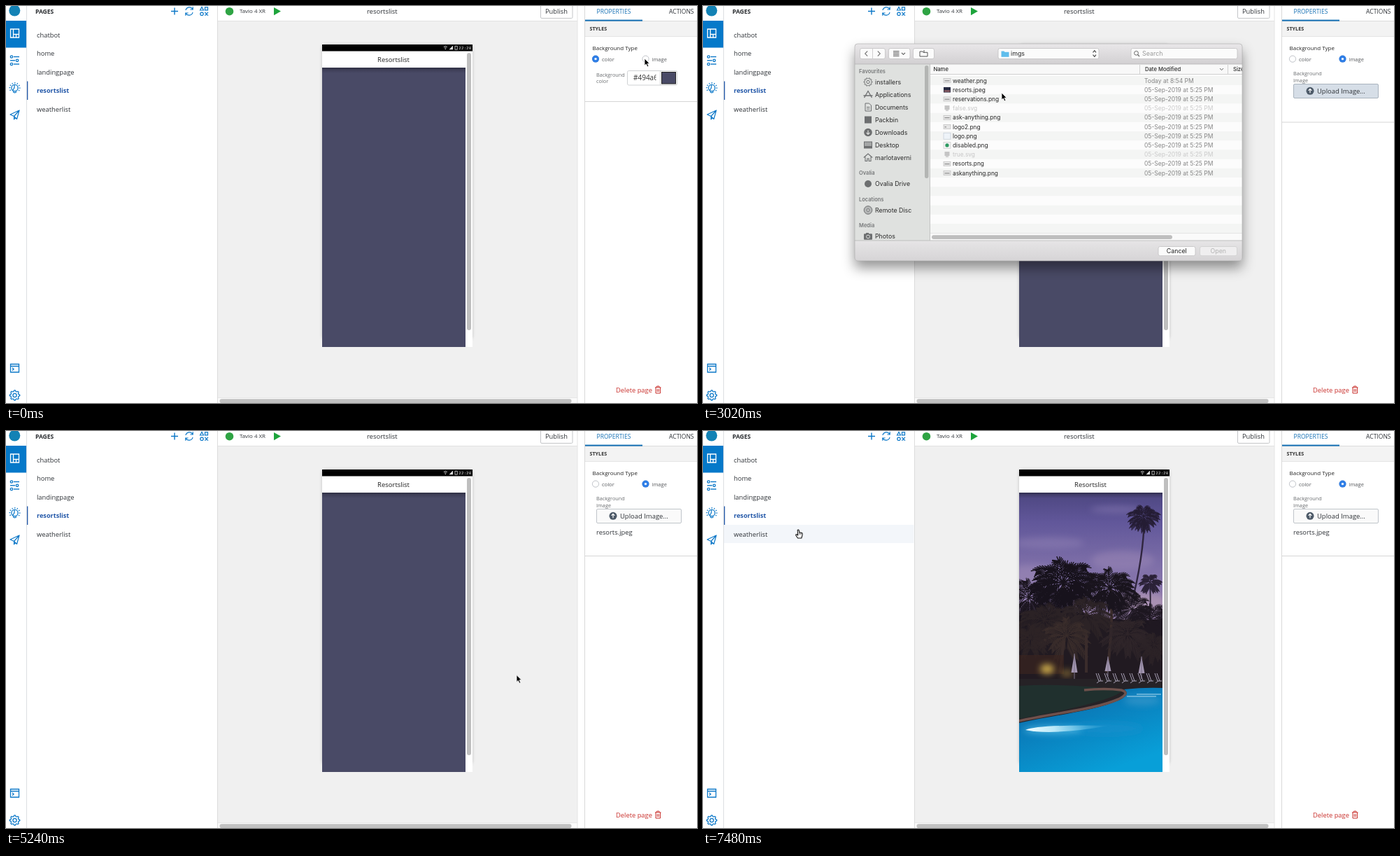
Write an HTML page that moves like this. It is 988x567 px and loops after 8 s.

```html
<!DOCTYPE html>
<html lang="en">
<head>
<meta charset="utf-8">
<title>Page builder: background image</title>
<style>
html, body { margin: 0; width: 100%; height: 100%; overflow: hidden; background: #fff; }
svg { display: block; width: 988px; height: 567px; font-family: "Open Sans", "Noto Sans", sans-serif; }
text { white-space: pre; }
.mac { font-family: Inter, "Liberation Sans", sans-serif; }
</style>
</head>
<body>
<svg id="stage" viewBox="0 0 988 567" xmlns="http://www.w3.org/2000/svg"></svg>
<script>
const LOOP = 8000;
const BLUE = '#0c78c8', INK = '#2f3338', NAVY = '#494a66';

// Shape helpers
const rect = (x, y, w, h, fill, more = '') => `<rect x="${x}" y="${y}" width="${w}" height="${h}" fill="${fill}" ${more}/>`;
const circle = (x, y, r, fill, more = '') => `<circle cx="${x}" cy="${y}" r="${r}" fill="${fill}" ${more}/>`;
const line = (d, color, w = 1, more = '') => `<path d="${d}" fill="none" stroke="${color}" stroke-width="${w}" ${more}/>`;
const area = (d, fill, more = '') => `<path d="${d}" fill="${fill}" ${more}/>`;
const text = (x, y, s, size, fill = INK, more = '') => `<text x="${x}" y="${y}" font-size="${size}" fill="${fill}" ${more}>${s}</text>`;
const group = (id, body, more = '') => `<g id="${id}" ${more}>${body}</g>`;
const MID = 'text-anchor="middle"', BOLD = 'font-weight="700"', ROUND = 'stroke-linecap="round" stroke-linejoin="round"';

function gradient(id, stops, x2 = 0, y2 = 1) {
  const body = stops.map(([at, c, o = 1]) => `<stop offset="${at}" stop-color="${c}" stop-opacity="${o}"/>`).join('');
  return `<linearGradient id="${id}" x1="0" y1="0" x2="${x2}" y2="${y2}">${body}</linearGradient>`;
}

function gear(x, y, r, teeth, color, w = 1.2) {
  let d = '';
  for (let i = 0; i < teeth * 4; i++) {
    const a = (i - .5) * Math.PI / teeth / 2, q = i % 4 < 2 ? r : r * .78;
    d += (i ? 'L' : 'M') + (x + q * Math.cos(a)).toFixed(1) + ' ' + (y + q * Math.sin(a)).toFixed(1);
  }
  return line(d + 'Z', color, w, 'stroke-linejoin="round"') + circle(x, y, r * .36, 'none', `stroke="${color}" stroke-width="${w}"`);
}

let seed = 11;
const rnd = () => (seed = seed * 16807 % 2147483647) / 2147483647;

// Crown of arched fronds with leaflets on both sides
function palm(x, y, r, n, color) {
  let d = '';
  const f = v => v.toFixed(1);
  for (let i = 0; i < n; i++) {
    const a = 2 * Math.PI * (i + rnd() * .6) / n, len = r * (.7 + .3 * rnd());
    const mx = x + Math.cos(a) * len * .6, my = y + Math.sin(a) * len * .6 - len * .14;
    const ex = x + Math.cos(a) * len, ey = y + Math.sin(a) * len * .8 + len * .2;
    d += `M${f(x)} ${f(y)}Q${f(mx)} ${f(my)} ${f(ex)} ${f(ey)}`;
    for (let k = 2; k < 13; k++) {
      const u = k / 13, v = 1 - u, leaf = r * .3 * (1 - u * .5);
      const px = v * v * x + 2 * u * v * mx + u * u * ex, py = v * v * y + 2 * u * v * my + u * u * ey;
      const way = Math.atan2(v * (my - y) + u * (ey - my), v * (mx - x) + u * (ex - mx));
      for (const turn of [-.6, .6])
        d += `M${f(px)} ${f(py)}l${f(Math.cos(way + turn) * leaf)} ${f(Math.sin(way + turn) * leaf + leaf * .35)}`;
    }
  }
  return line(d, color, Math.max(1, r * .026), 'stroke-linecap="round"');
}

const defs = `<defs>
  ${gradient('sky', [[0, '#4c4680'], [.14, '#61579a'], [.35, '#7e6fa8'], [.55, '#9580b0'], [.8, '#a98aa8']])}
  ${gradient('pool', [[0, '#0d5f97'], [.4, '#0a7cba'], [1, '#089fd8']], .6)}
  ${gradient('beam', [[0, '#f4feff'], [.35, '#c9f0fc', .9], [1, '#5cc4ea', 0]], 1, 0)}
  ${gradient('under', [[0, '#20202f', .6], [.5, '#20202f', .22], [1, '#20202f', 0]])}
  ${gradient('bar', [[0, '#e9e7e9'], [1, '#d2d0d2']])}
  ${gradient('foot', [[0, '#e6e5e6'], [1, '#d6d4d6']])}
  ${gradient('go', [[0, '#62adfb'], [1, '#0b68f6']])}
  ${gradient('goDown', [[0, '#4394f4'], [1, '#0c57e0']])}
  <clipPath id="screen"><rect x="452" y="88" width="205" height="399"/></clipPath>
  <clipPath id="hexBox"><rect x="890" y="93" width="39.5" height="20"/></clipPath>
  <clipPath id="sheet"><rect x="217" y="54" width="554" height="310" rx="4"/></clipPath>
  <clipPath id="side"><rect x="217" y="83" width="108" height="252"/></clipPath>
  <filter id="soft" x="-50%" y="-100%" width="200%" height="300%"><feGaussianBlur stdDeviation="5"/></filter>
  <filter id="drop" filterUnits="userSpaceOnUse" x="140" y="0" width="720" height="470">
    <feDropShadow dx="0" dy="10" stdDeviation="9" flood-opacity=".42"/></filter>
  <filter id="lift" filterUnits="userSpaceOnUse" x="430" y="40" width="260" height="460">
    <feDropShadow dx="0" dy="0" stdDeviation="2" flood-opacity=".2"/></filter>
</defs>`;

function rail() {
  const plane = 'M6 155 19 149 15.5 161.5 11.5 157.5ZM11.5 157.5 19 149M11.5 157.5V162L13.3 159.3';
  let rays = '';
  for (let i = 0; i < 9; i++) {
    const a = Math.PI * (.85 + i * .165), c = Math.cos(a), s = Math.sin(a);
    rays += `M${12.5 + c * 6.3} ${117 + s * 6.3}L${12.5 + c * 8} ${117 + s * 8}`;
  }
  let rows = '';
  [72.5, 77.8, 83].forEach((y, i) => {
    const x = i === 1 ? 16 : 8;
    rows += circle(x, y, 1.7, '#fff', `stroke="${BLUE}" stroke-width="1.3"`)
      + line(i === 1 ? `M6 ${y}H13` : `M11 ${y}H19`, BLUE, 1.4);
  });
  return rect(29, 0, 1, 567, '#dcdfe2') + circle(12.3, 6.5, 8, '#1382b5') + rect(0, 21, 29, 38.5, '#0579c9')
    + line('M6.5 33H18.5V45H6.5ZM10.5 33V45M10.5 40.5H18.5M14.5 40.5V45', '#fff', 1.3)
    + rows + line(rays, BLUE, 1.2) + circle(12.5, 117, 4.6, 'none', `stroke="${BLUE}" stroke-width="1.3"`)
    + line('M9 121Q12.5 118 12 113M10 122.5Q12.5 125 15 122.5', BLUE, 1.2)
    + line(plane, BLUE, 1.2, ROUND)
    + line('M6.5 511.5H18.5V523H6.5ZM6.5 514.5H18.5M9 516.8 11 518.7 9 520.5', BLUE, 1.3)
    + gear(12.5, 556, 7.2, 8, BLUE, 1.3);
}

function pages() {
  const names = ['chatbot', 'home', 'landingpage', 'resortslist', 'weatherlist'];
  return group('hoverRow', rect(30, 134, 271.5, 26, '#f3f6fa'))
    + rect(302, 0, 1, 567, '#dcdcdc') + text(42, 10.6, 'PAGES', 8.5, '#2a2d31', BOLD)
    + line('M241 2.5V12.5M236 7.5H246', BLUE, 1.4)
    + line('M257 6A5.3 5.3 0 0 1 266.8 4.5M267.2 1.2V5H263.4M267 9A5.3 5.3 0 0 1 257.2 10.5M256.8 13.8V10H260.6', BLUE, 1.2)
    + line('M277.5 6 280 1.5 282.5 6ZM284.5 1.8H288.5V5.8H284.5ZM284.3 9 289 13.7M289 9 284.3 13.7', BLUE, 1.2)
    + circle(280, 11.3, 2.2, 'none', `stroke="${BLUE}" stroke-width="1.2"`)
    + names.map((s, i) => i === 3
      ? text(44, 124, s, 9.15, '#2257a8', BOLD) : text(44, 45 + i * 26.4, s, 9.35)).join('')
    + rect(30, 107.5, 1.3, 26.5, '#2257a8');
}

function canvas() {
  return rect(303, 21, 514, 539, '#f0f0f0') + rect(303, 21, 514, 1, '#e2e2e2')
    + rect(303, 559, 514, 8, '#fafafa') + rect(303, 559, 514, 1, '#e6e6e6')
    + rect(305.5, 561.3, 503, 5.7, '#c1c1c1', 'rx="2.8"')
    + rect(816.5, 0, 1, 567, '#e4e4e4')
    + circle(319.5, 7.7, 5.8, '#2fa444') + text(334, 10, 'Tavio 4 XR', 7.9)
    + area('M383 2 393 7.6 383 13.2Z', '#1ea43c')
    + text(537.8, 11.2, 'resortslist', 9.5, INK, MID)
    + rect(764.5, -3.5, 45.5, 21, '#fff', 'rx="1.5" stroke="#c4c6c8"')
    + text(787, 11.3, 'Publish', 9.35, INK, MID);
}

function phone() {
  return rect(452, 55, 215, 421, '#fff', 'rx="5" filter="url(#lift)"')
    + rect(452, 55, 215, 432, '#fff') + rect(452, 55, 215, 9.5, '#000')
    + line('M625.8 58.5Q628.3 56 630.8 58.5M626.9 60Q628.3 58.7 629.7 60', '#ddd', .9) + circle(628.3, 61.4, .7, '#ddd')
    + area('M633.5 62.3H639V56.5Z', '#ddd') + rect(642, 57.2, 3.2, 5, 'none', 'stroke="#ddd" stroke-width=".8"')
    + text(647.3, 61.8, '22:20', 6, '#eee', 'font-family="Liberation Mono, monospace"')
    + text(554, 80, 'Resortslist', 9.5, '#222', MID)
    + rect(659, 67, 6, 396, '#bfbfbf', 'rx="3"')
    + rect(452, 88, 205, 399, NAVY) + group('photo', photo(), 'clip-path="url(#screen)"')
    + rect(452, 88, 205, 8, 'url(#under)');
}

function photo() {
  const cloud = (x, y, rx, ry, c, o) => `<ellipse cx="${x}" cy="${y}" rx="${rx}" ry="${ry}" fill="${c}" opacity="${o}" filter="url(#soft)"/>`;
  const shade = (x, y, h) => area(`M${x} ${y}l4.5 ${h * .75}h-9Z`, '#a396b0') + rect(x - .5, y, 1, h, '#7b7088');
  let chairs = '';
  for (let x = 562; x < 655; x += 12) chairs += `M${x} 346l4 11h6M${x + 3} 346l4 11M${x + 1} 360l4 -3`;
  return rect(452, 88, 205, 300, 'url(#sky)')
    + cloud(590, 112, 36, 5, '#8b7db5', .5) + cloud(495, 160, 50, 8, '#8f80b4', .5)
    + cloud(600, 185, 45, 14, '#9c88b6', .5) + cloud(470, 205, 35, 14, '#a08cb8', .5) + cloud(625, 245, 40, 14, '#b79cb4', .6)
    + line('M631 124Q630 180 612 250', '#30263f', 2.4) + palm(630, 122, 25, 13, '#241c33')
    + line('M639 218Q641 245 637 300', '#241c30', 1.8) + palm(639, 216, 18, 11, '#2a2136')
    // tree belt
    + area('M452 262Q500 250 550 262T657 268V370H452Z', '#211a21')
    + palm(466, 238, 40, 14, '#1b151f') + palm(640, 268, 36, 14, '#1f1822') + palm(614, 255, 34, 13, '#1d1720')
    + line('M515 218Q522 270 510 345M583 226Q587 290 577 345M548 272V345', '#3a2c2b', 4)
    + palm(515, 217, 54, 20, '#17121c') + palm(582, 224, 42, 18, '#19141d')
    + palm(548, 262, 40, 14, '#2c2326') + palm(488, 270, 40, 13, '#2b2225') + palm(607, 290, 38, 13, '#30262a')
    + palm(520, 292, 38, 11, '#3a2d2b') + palm(468, 296, 30, 11, '#2e2426') + palm(645, 305, 28, 11, '#2c2327')
    // garden and terrace
    + rect(452, 320, 64, 27, '#3a2420', 'opacity=".7"') + cloud(492, 340, 10, 7, '#d9b750', .9) + cloud(520, 346, 8, 5, '#b5923e', .6)
    + rect(452, 354, 205, 66, '#262226') + area('M452 364Q520 360 600 370Q590 386 452 411Z', '#20302e')
    + shade(531, 318, 36) + shade(579, 322, 28) + shade(627, 322, 32)
    + line(chairs, '#a8a1b6', 1)
    // pool
    + area('M452 417C500 406 560 400 596 384Q612 376 602 369Q630 366 657 367V487H452Z', 'url(#pool)')
    + line('M452 414C500 403 560 398 594 383Q612 374 598 370Q575 367 545 370', '#6f514c', 3.6)
    + cloud(575, 425, 55, 9, '#1590cc', .7) + cloud(628, 385, 26, 7, '#3f9cce', .6)
    + line('M606 379H648M620 376H655', '#a9d8ee', 1.3, 'opacity=".7"')
    + cloud(500, 427, 42, 6, '#63c3ea', .65)
    + area('M461 427Q480 419 580 421Q500 435 461 427Z', 'url(#beam)');
}

function radio(id, x) {
  return circle(x, 75.6, 4.6, '#fff', 'stroke="#b9bdc2" stroke-width=".9"')
    + group(id, circle(x, 75.6, 5, '#2f7ee6') + circle(x, 75.6, 1.7, '#fff'));
}

function panel() {
  const small = (y, s) => text(844, y, s, 7.3, '#6a6d70');
  return rect(827, 0, 1, 567, '#d8d8d8') + rect(828, 21, 160, 1, '#dcdcdc')
    + text(844.5, 10.5, 'PROPERTIES', 8.55, '#1470b4') + text(948, 10.5, 'ACTIONS', 8.55)
    + rect(828, 19.6, 82, 2, '#1470b4')
    + rect(828, 22, 160, 21, '#f3f3f3') + rect(828, 43, 160, 1, '#e4e4e4')
    + text(834.5, 35, 'STYLES', 7.2, '#333', BOLD) + text(838.5, 63.2, 'Background Type', 8, '#222')
    + radio('colorOn', 843) + radio('imageOn', 914.5)
    + text(852, 78.5, 'color', 7.6, '#55585b') + text(923.5, 78.5, 'image', 7.5, '#55585b')
    + group('colorForm', small(100.8, 'Background') + small(110, 'color')
      + rect(888.5, 92.5, 71, 20.5, '#fff', 'rx="2" stroke="#d0d2d4"') + line('M935.5 92V113', '#d0d2d4')
      + text(897, 106.4, '#494a66', 10, '#333', 'clip-path="url(#hexBox)"')
      + rect(937.5, 94.5, 20, 16.5, NAVY, 'stroke="#222"'))
    + group('imageForm', small(99.2, 'Background') + small(108.5, 'Image')
      + rect(844.5, 111.5, 121, 20, '#fafafa', 'id="upload" rx="1.5" stroke="#c0c5ca"')
      + circle(868, 121.3, 5.5, '#4d5a68') + line('M868 124.3V118.6M865.6 120.8 868 118.4 870.4 120.8', '#fff', 1.2)
      + text(878, 125, 'Upload Image...', 9.45))
    + group('fileName', text(844, 148, 'resorts.jpeg', 9.4))
    + rect(828, 0, 160, 1, '#d6d6d6', 'id="divider"')
    + text(872, 552, 'Delete page', 9.35, '#c9302c')
    + line('M928 544.8H936.5M930.5 544.5V543H934V544.5M929 545V553H935.5V545M931.2 547V551M933.3 547V551', '#c9302c', 1);
}

function sidebar() {
  const G = '#6d6f70';
  const heads = [[93, 'Favourites'], [238.5, 'Ovalia'], [276, 'Locations'], [313.5, 'Media']];
  const items = [
    [108.5, 'installers', y => gear(236, y, 6, 10, G, 1)],
    [126.5, 'Applications', y => line(`M230.5 ${y + 4.5} 236 ${y - 5} 241.5 ${y + 4.5}M229.5 ${y + 1.5}H242.5`, G, 1.3)],
    [144.5, 'Documents', y => line(`M232 ${y - 5.5}H237.5L240.5 ${y - 2.5}V${y + 5.5}H232ZM234 ${y}H238.5M234 ${y + 2.5}H238.5`, G, 1)],
    [162.5, 'Packbin', y => rect(231, y - 5, 10, 10, G)],
    [180.5, 'Downloads', y => circle(236, y, 5.8, G) + line(`M236 ${y - 3}V${y + 2.6}M233.6 ${y + .3} 236 ${y + 2.8} 238.4 ${y + .3}`, '#e0e2e0', 1.2)],
    [198.5, 'Desktop', y => rect(230.5, y - 4.5, 11, 9, '#a4a6a6', `stroke="${G}"`) + rect(230.5, y + 1.5, 11, 3, G)],
    [216.5, 'marlotaverni', y => line(`M229.8 ${y} 236 ${y - 5.5} 242.2 ${y}M232 ${y - 1}V${y + 5}H234.8V${y + 1.5}H237.2V${y + 5}H240V${y - 1}`, G, 1.1)],
    [254, 'Ovalia Drive', y => circle(236, y, 5, G)],
    [291.5, 'Remote Disc', y => circle(236, y, 5.8, '#b4b6b6', `stroke="${G}"`) + circle(236, y, 1.8, '#e0e2e0', `stroke="${G}"`)],
    [329, 'Photos', y => rect(230, y - 3.8, 12, 8.5, G, 'rx="1"') + rect(233, y - 5, 4, 2, G) + circle(236, y + .5, 2.4, G, 'stroke="#e0e2e0"')]
  ];
  return `<g clip-path="url(#side)">` + rect(217, 83, 108, 252, '#dfe1df')
    + heads.map(([y, s]) => text(223, y + 2.8, s, 7.5, '#77797a', 'font-weight="600"')).join('')
    + items.map(([y, s, icon]) => icon(y) + text(246, y + 3.2, s, 8.8, '#2b2b2b')).join('')
    + rect(317, 85, 5.5, 161, '#b3b5b3', 'rx="2.7"') + '</g>' + rect(324, 83, 1, 252, '#c3c4c3');
}

function fileList() {
  const files = ['weather.png', 'resorts.jpeg', 'reservations.png', 'false.svg', 'ask-anything.png', 'logo2.png',
    'logo.png', 'disabled.png', 'true.svg', 'resorts.png', 'askanything.png'];
  let stripes = '', rows = '';
  for (let i = 0; i < 17; i += 2) stripes += rect(325, 99.8 + i * 13.2, 446, 13.2, '#f4f5f4');
  files.forEach((s, i) => {
    const y = 106.5 + i * 13.2, off = s.endsWith('svg'), picked = i === 1 ? 'class="pick"' : '';
    if (i === 1) rows += group('selection', rect(325, 113.2, 446, 12.6, '#0b61dc'));
    const icon = off ? rect(345.5, y - 4, 7, 6, '#c4c4c4') + rect(347, y + 2, 4, 2, '#d0d0d0')
      : i === 1 ? rect(344, y - 3.8, 10, 7.6, '#262a40') + rect(344.8, y + .5, 8.4, 2.5, '#8a5b62')
      : i === 6 ? rect(344, y - 4.5, 10, 9, '#eef3f8', 'stroke="#c3ccd6" stroke-width=".7"')
      : i === 7 ? rect(344, y - 4.5, 10, 9, '#f3f3f3', 'stroke="#c9c9c9" stroke-width=".7"') + circle(349, y, 2.6, '#2d9a62')
      : rect(344, y - 3, 10, 6, '#e6e6e6', 'stroke="#bdbdbd" stroke-width=".7"') + rect(345.5, y - .3, i === 5 ? 2.5 : 7, 1.2, '#8a8a8a');
    rows += icon + text(357, y + 3, s, 8.3, off ? '#c6c6c6' : '#262626', picked)
      + text(631, y + 3, i ? '05-Sep-2019 at 5:25 PM' : 'Today at 8:54 PM', 8.5, off ? '#cacaca' : '#858585', picked);
  });
  const head = (x, s) => text(x, 93.2, s, 7.65, '#2b2b2b', 'font-weight="500"');
  return rect(325, 83, 446, 252, '#fcfcfc') + group('stripes', stripes) + rows
    + rect(325, 83, 446, 15, '#f8f8f8') + rect(325, 97, 446, 1, '#d0d0d0')
    + head(329.5, 'Name') + head(632, 'Date Modified') + head(758, 'Size')
    + line('M624.5 84V97M750.5 84V97', '#d0d0d0') + line('M739 89 741.5 91.7 744 89', '#666', 1)
    + rect(325, 324.5, 446, 10.5, '#fafafa') + rect(325, 324, 446, 1, '#e4e4e4')
    + rect(327, 327.2, 344, 5.8, '#bebebe', 'rx="2.9"');
}

function dialog() {
  const button = (x, y, w, h, more = '') => rect(x, y, w, h, '#fbfbfb', `rx="2.5" stroke="#c2c1c2" stroke-width=".8" ${more}`);
  return rect(217, 54, 554, 310, '#ddd', 'rx="4" filter="url(#drop)"')
    + '<g clip-path="url(#sheet)">' + rect(217, 54, 554, 29, 'url(#bar)') + sidebar() + fileList()
    + rect(217, 82.5, 554, .9, '#b9b8b9') + rect(217, 335, 554, 29, 'url(#foot)') + rect(217, 334.5, 554, 1, '#c0bfc0')
    + button(224.5, 60.5, 36, 15) + line('M242.5 60.5V75.5', '#cfcecf')
    + line('M235.2 64.5 231.7 68 235.2 71.5M249.8 64.5 253.3 68 249.8 71.5', '#7a7a7a', 1.1)
    + button(265.5, 60.5, 30.5, 15)
    + line('M272 64.7H280.5M272 66.9H280.5M272 69.1H280.5M272 71.3H280.5', '#555', 1) + line('M284 66.8 286.5 69.3 289 66.8', '#555', 1.1)
    + button(300.5, 60.5, 30, 15) + line('M310 65H314L315.2 66.3H321V72H310ZM316 63V67', '#555', 1)
    + button(422, 60.5, 144, 15) + area('M426.5 64.5H430.5L431.5 65.7H437.5V72.7H426.5Z', '#5fbdec')
    + text(440, 71.3, 'imgs', 8.9, '#262626') + line('M557.5 66.3 559.8 63.7 562 66.3M557.5 69.7 559.8 72.3 562 69.7', '#444', 1.1)
    + button(612, 60.5, 152, 15) + circle(619.5, 67.3, 2.9, 'none', 'stroke="#666"') + line('M621.6 69.5 624 72', '#666', 1.1)
    + text(628, 71.2, 'Search', 8.9, '#9a9a9a')
    + button(651, 343.5, 53, 13.2) + text(677.3, 353.2, 'Cancel', 8.8, '#222', MID)
    + button(710.5, 343.5, 53, 13.2, 'id="openBox"') + text(736.8, 353.2, 'Open', 8.8, '#b3b3b3', MID + ' id="openText"')
    + '</g>' + rect(217, 54, 554, 310, 'none', 'rx="4" stroke="#a9a9a9" stroke-width=".6"');
}

const pointers = group('arrow', area('M0 0V10L2.3 7.9 4 11.8 5.8 11 4.1 7.2H7.2Z', '#000', 'stroke="#fff" stroke-width=".8"'))
  + group('hand', area('M-1.8 -5.5Q-.7 -6.6 .2 -5.3L.8 -1.9Q3 -2.4 4.8 -1.3 5.5 0 4.8 2.6L3.8 6H-1.5L-4.2 2Q-4.6 .4 -3 .7L-1.3 2Z', '#fff', 'stroke="#111" stroke-width="1.1" stroke-linejoin="round"')
    + line('M1 -1.5V1M3 -1.4V1', '#111', .7));

const stage = document.getElementById('stage');
stage.innerHTML = defs + rect(0, 0, 988, 567, '#fff') + rail() + pages() + canvas() + phone() + panel()
  + group('dialog', dialog(), 'class="mac"') + pointers;

const $ = id => document.getElementById(id);
const show = (id, on) => $(id).setAttribute('visibility', on ? 'inherit' : 'hidden');
const paint = (el, fill) => el.setAttribute('fill', fill);
const picks = [...document.querySelectorAll('.pick')].map(el => [el, el.getAttribute('fill')]);

// Pointer tip: [time, x, y], held until the next entry
const track = [
  [0, 913, 75], [120, 912, 74.5], [770, 910, 81], [890, 902, 103], [1010, 897, 116], [1160, 895, 119], [1450, 897, 118],
  [2290, 614, 156], [2430, 480.5, 181], [2670, 464, 163], [2790, 448, 146], [2900, 436, 133],
  [3020, 427, 124], [3130, 422, 119], [3250, 420, 117], [3720, 685, 275], [3870, 710, 314],
  [3985, 718, 329], [4100, 724, 339], [4220, 727, 344], [4880, 725, 344.5], [5030, 730, 348.5],
  [6500, 470, 240], [6620, 293, 167.5], [6880, 215, 157], [7000, 150, 149],
  [7120, 104, 147], [7240, 88, 146], [7360, 112, 147], [7480, 137, 147]
];

function draw(t) {
  const image = t >= 410, open = t >= 1810 && t < 5240, picked = t >= 3610, done = t >= 5240, hover = t >= 6880;
  show('colorOn', !image);
  show('colorForm', !image);
  show('imageOn', image);
  show('imageForm', image);
  show('fileName', done);
  $('divider').setAttribute('y', !image ? 136 : done ? 178 : 165.5);
  const pressed = t >= 1450 && !done;
  paint($('upload'), pressed ? '#d6dee7' : '#fafafa');
  $('upload').setAttribute('stroke', pressed ? '#a9b3bd' : '#c0c5ca');

  show('dialog', open);
  show('selection', picked);
  show('stripes', t < 4880);
  picks.forEach(([el, fill]) => paint(el, picked ? '#fff' : fill));
  paint($('openBox'), !picked ? '#efeeef' : t < 4730 ? 'url(#go)' : 'url(#goDown)');
  $('openBox').setAttribute('stroke', picked ? '#2a70d8' : '#cfcecf');
  paint($('openText'), picked ? '#fff' : '#b3b3b3');

  show('photo', t >= 5750);
  show('hoverRow', hover);
  show('arrow', !hover);
  show('hand', hover);
  const [, x, y] = track.filter(k => k[0] <= t).pop();
  $(hover ? 'hand' : 'arrow').setAttribute('transform', `translate(${x} ${y})`);
}

const start = performance.now();
function tick() {
  draw((performance.now() - start) % LOOP);
  requestAnimationFrame(tick);
}
tick();
</script>
</body>
</html>
```
